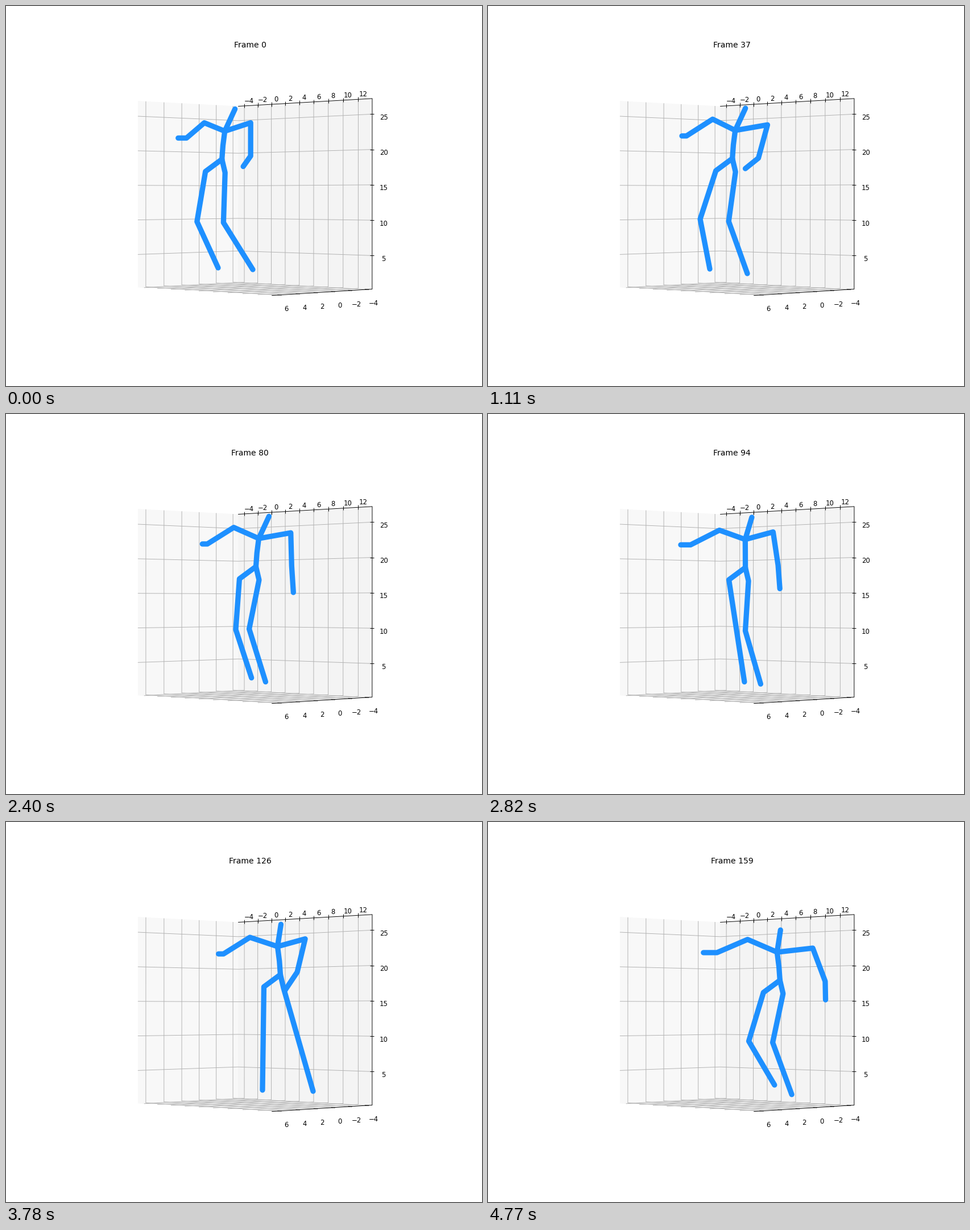
Recreate the animation shown at these times as a matplotlib script. Size 837 by 669 pixels, loop 4.8 s.

```python
import numpy as np
import matplotlib.pyplot as plt
from matplotlib.animation import FuncAnimation
from matplotlib.collections import LineCollection

W, H = 837, 669
FRAMES, STEP_MS = 160, 30
THIN = 0.93
TICK_SIZE, TITLE_SIZE = 11.625, 13.95

# At 72 dpi one point is one pixel.
fig = plt.figure(figsize=(W / 72, H / 72), dpi=72, facecolor="white")
ax = fig.add_axes([0, 0, 1, 1])
ax.set_xlim(0, W)
ax.set_ylim(H, 0)
ax.axis("off")


# ---- the room: u runs along the right wall, v along the left, z upwards ----

U0, U1 = -4.945, 13.81
V0, V1 = -4.62, 6.865
Z0, Z1 = 0.25, 27.21

CORNERS = {
    (U0, V1, Z1): (232, 167), (U0, V0, Z1): (408, 176.5), (U1, V0, Z1): (644, 163),
    (U0, V1, Z0): (232, 495), (U0, V0, Z0): (408, 486), (U1, V0, Z0): (644, 498),
    (U1, V1, Z0): (467, 510),
}


def solve_camera(corners):
    """Perspective matrix that carries the room's corners to the stage."""
    rows, goal = [], []
    for p, (x, y) in corners.items():
        p = np.array(p)
        rows.append([*p, 1, 0, 0, 0, 0, *(-x * p)])
        rows.append([0, 0, 0, 0, *p, 1, *(-y * p)])
        goal += [x, y]
    solution = np.linalg.lstsq(np.array(rows), np.array(goal), rcond=None)[0]
    return np.append(solution, 1).reshape(3, 4)


CAMERA = solve_camera(CORNERS)


def project(*points):
    flat = CAMERA @ np.column_stack([points, np.ones(len(points))]).T
    return (flat[:2] / flat[2]).T


def wall(color, *points):
    ax.fill(*project(*points).T, color=color, lw=0, zorder=1)


def lines(paths, color, z):
    ax.add_collection(LineCollection(paths, colors=color, linewidths=THIN, zorder=z))


def tick(at, value, shift, reach):
    """Short mark through a point, and its number beside it."""
    reach = np.array(reach)
    ticks.append([at - reach, at + 0.85 * reach])
    x, y = at + shift
    ax.text(x, y + 4.2, str(value).replace("-", "\u2212"),
            size=TICK_SIZE, ha="center", va="baseline")


wall("#f8f8f8", (U0, V1, Z1), (U0, V0, Z1), (U0, V0, Z0), (U0, V1, Z0))
wall("#f4f4f4", (U0, V0, Z1), (U1, V0, Z1), (U1, V0, Z0), (U0, V0, Z0))
wall("#f4f4f4", (U0, V1, Z0), (U0, V0, Z0), (U1, V0, Z0), (U1, V1, Z0))

grid, ticks = [], []
for u in range(-4, 13, 2):
    path = project((u, V0, Z1), (u, V0, Z0), (u, V1, Z0))
    grid.append(path)
    tick(path[0], u, (8.5, -9.3), (0, 4))
for v in range(-4, 7, 2):
    path = project((U0, v, Z1), (U0, v, Z0), (U1, v, Z0))
    grid.append(path)
    tick(path[2], v, (11.2, 23.6), (4, 0.25))
for z in range(5, 26, 5):
    path = project((U0, V1, z), (U0, V0, z), (U1, V0, z))
    grid.append(path)
    tick(path[2], z, (20.3, 5.3), (4, 0))

lines(grid, "#b0b0b0", 2)
lines([project((U0, V0, Z1), (U1, V0, Z1), (U1, V0, Z0), (U1, V1, Z0))], "black", 3)
lines(ticks, "black", 3)

title = ax.text(429, 73, "", size=TITLE_SIZE, ha="center", va="baseline")


# ---- the walker -----------------------------------------------------------

def ease(n, start, end):
    s = np.clip((n - start) / (end - start), 0, 1)
    return s * s * (3 - 2 * s)


def wave(n, peak, period):
    return np.cos(2 * np.pi * (n - peak) / period)


def step(n, start, end, dx, dy, arc):
    """Offset of a foot that moves by (dx, dy) along an arc."""
    s = np.clip((n - start) / (end - start), 0, 1)
    return np.array([dx, dy]) * ease(n, start, end) + (0, arc * np.sin(np.pi * s))


def knee(hip, ankle, thigh, shin):
    """Joint of a two-bone leg, bent towards the left."""
    leg = ankle - hip
    d = np.hypot(*leg)
    along = (d * d + thigh**2 - shin**2) / (2 * d)
    bend = np.sqrt(max(thigh**2 - along**2, 0))
    ux, uy = leg / d
    return hip + along * leg / d + bend * np.array([-uy, ux])


def pose(n):
    """Chains of joints at one moment."""
    bob = wave(n, 60, 46)
    twist = wave(n, 58, 105)
    lean = 5 - 10 * ease(n, 80, 107)
    hang = ease(n, 40, 58) - ease(n, 84, 112)
    swing = bob * (1 - 0.6 * hang) + 0.1 * hang

    turn = 50 * np.sin(np.pi / 2 * min(n / 37, 1)) - 8 * ease(n, 37, 60)
    pelvis = np.array([379.7 + turn + 0.935 * max(n - 61, 0),
                       270.5 + 2 * bob + 7 * ease(n, 126, 159)])
    spine = pelvis + (0.35 * lean, -24)
    neck = pelvis + (lean, -49.5)
    head = neck + (12 + 1.2 * lean, -39)

    l_shoulder = neck + (-36 - 0.1 * n, -18.5 - 4 * twist)
    l_elbow = l_shoulder + (-33 - 18 * ease(n, 0, 30) - 5 * bob, 25.5 - 4 * bob)
    l_hand = l_elbow + (-18 - 10 * bob, 0)

    r_shoulder = neck + (54 + 9 * twist, -11 + 4 * twist)
    r_elbow = r_shoulder + (8 + 24 * swing, 58.5)
    r_hand = r_elbow + (-8 + 15 * swing + 15 * hang,
                        18.5 + 28 * hang + 14 * ease(n, 85, 115))

    l_hip = pelvis + (-29, 21.5)
    l_ankle = (np.array([373, 461]) + step(n, 0, 37, 17, 2, 0)
               + step(n, 55, 95, 61, 9, -5) + step(n, 128, 160, 53, -9, 0))
    r_hip = pelvis + (5.5, 23.5)
    r_ankle = (np.array([434, 464]) + step(n, 0, 35, 22, 7, 2)
               + step(n, 78, 124, 84, 3, 4) + step(n, 126, 162, -6, 3, 11))

    return (
        (head, neck, spine, pelvis),
        (neck, l_shoulder, l_elbow, l_hand),
        (neck, r_shoulder, r_elbow, r_hand),
        (pelvis, l_hip, knee(l_hip, l_ankle, 89.5, 89.5), l_ankle),
        (pelvis, r_hip, knee(r_hip, r_ankle, 88, 97.5), r_ankle),
    )


limbs = [ax.plot([], [], color="dodgerblue", lw=9.3, zorder=5,
                 solid_capstyle="round", solid_joinstyle="round")[0]
         for _ in pose(0)]


def draw(n):
    title.set_text(f"Frame {n}")
    for limb, chain in zip(limbs, pose(n)):
        limb.set_data(*np.transpose(chain))
    return [title, *limbs]


anim = FuncAnimation(fig, draw, frames=FRAMES, interval=STEP_MS,
                     repeat=True, repeat_delay=0, blit=False)
plt.show()
```
